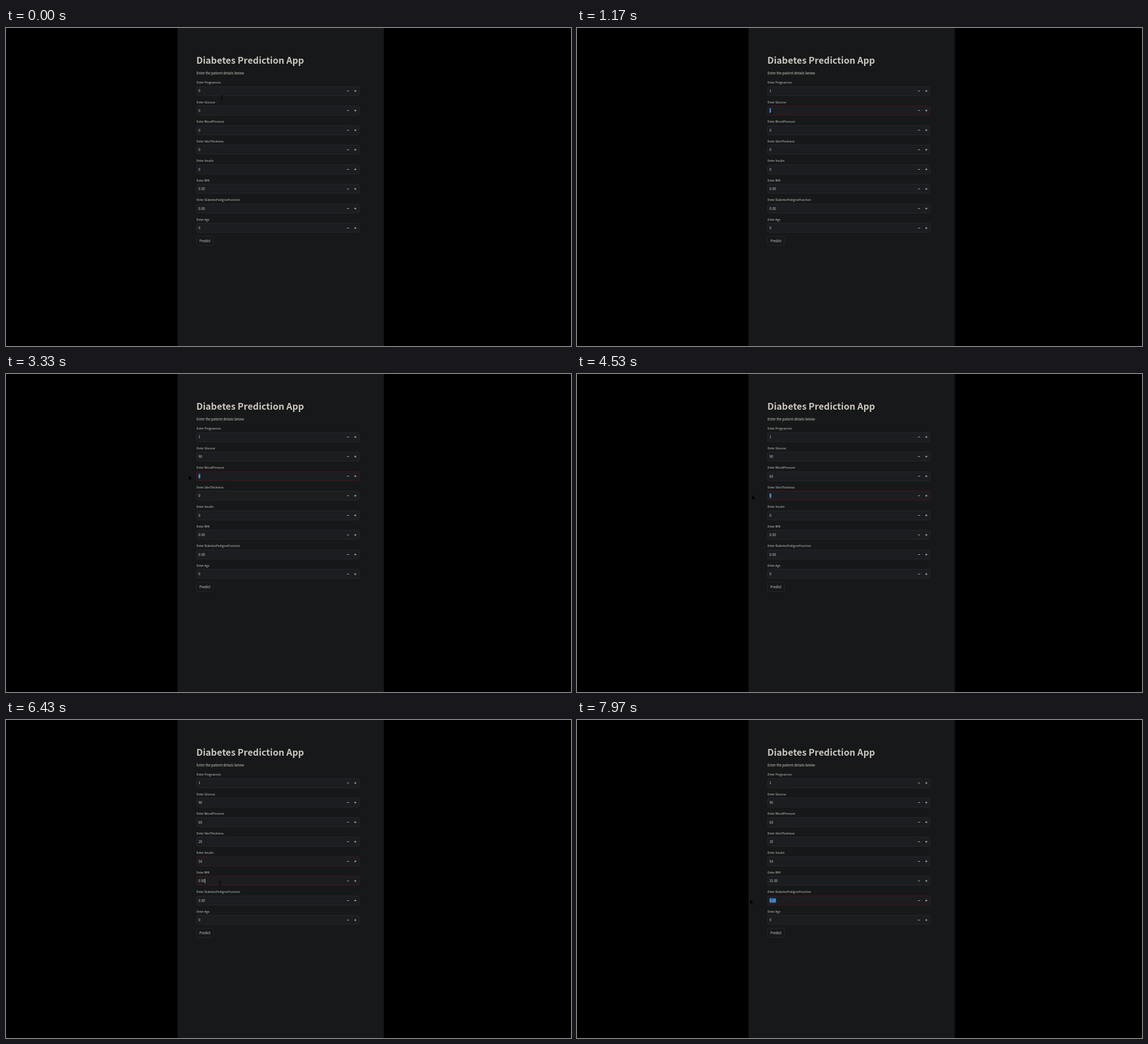
Animation of 998x561 px, one loop 8000 ms. Source, as an HTML page with a canvas:

```html
<!DOCTYPE html>
<html lang="en">
<head>
<meta charset="utf-8">
<title>Diabetes Prediction App</title>
<style>
  html, body { margin: 0; width: 100%; height: 100%; overflow: hidden; background: #000; }
  canvas { display: block; }
</style>
</head>
<body>
<canvas id="stage"></canvas>
<script>
const W = 998, H = 561, LOOP = 8000;
const ZOOM = 0.409;          // page scale inside the recording
const GLYPH = 1 / 1.117;     // the CJK family draws Latin letters larger
const FAMILY = '"Noto Sans CJK JP", "Noto Sans CJK SC", "Noto Sans CJK", "Open Sans", sans-serif';
const C = {
  panel: '#161819', field: '#1b1d20', border: '#26292d', focus: '#501019',
  title: '#cac7be', text: '#d2d0c9', hint: '#85847f', select: '#1c62ad'
};
const LEFT = 336.5, WIDTH = 287.5;
const APPROACH = 300, HOLD = 100, DRAG = 280, KEY_GAP = 180;

// focus: click time; clickX, outX: where the selecting drag starts and ends
const fields = [
  { name: 'Pregnancies', typed: '1', focus: 300, outX: 322 },
  { name: 'Glucose', typed: '90', focus: 1000, outX: 332 },
  { name: 'BloodPressure', typed: '60', focus: 3030, outX: 323 },
  { name: 'SkinThickness', typed: '20', focus: 4270, outX: 308 },
  { name: 'Insulin', typed: '54', focus: 5520, outX: 310 },
  { name: 'BMI', typed: '31', focus: 6340, outX: 337, clickX: 378, decimals: 2 },
  { name: 'DiabetesPedigreeFunction', typed: '0', focus: 7640, outX: 306, decimals: 2 },
  { name: 'Age', typed: '0', focus: LOOP + 1000 }
];
fields.forEach((f, i) => {
  const next = fields[i + 1];
  f.y = 111.1 + 34.56 * i;
  f.clickX = f.clickX || 350;
  f.blur = next ? next.focus : Infinity;
  f.firstKey = f.focus + 0.6 * (f.blur - f.focus);
});

const canvas = document.getElementById('stage');
const ctx = canvas.getContext('2d');
const dpr = window.devicePixelRatio || 1;
canvas.width = W * dpr;
canvas.height = H * dpr;
canvas.style.width = W + 'px';
canvas.style.height = H + 'px';

const clamp = v => Math.max(0, Math.min(1, v));
const ease = v => v * v * (3 - 2 * v);
const mix = (a, b, k) => a + (b - a) * k;
const progress = (t, from, to) => ease(clamp((t - from) / (to - from)));

function setFont(size, weight = 400) {
  ctx.font = `${weight} ${size * GLYPH}px ${FAMILY}`;
}

function text(str, x, y, size, { color = C.text, weight = 400, align = 'left' } = {}) {
  ctx.save();
  ctx.translate(x, y);
  ctx.scale(ZOOM, ZOOM);
  setFont(size, weight);
  ctx.textAlign = align;
  ctx.fillStyle = color;
  ctx.fillText(str, 0, 0);
  ctx.restore();
}

function textWidth(str, size) {
  setFont(size);
  return ctx.measureText(str).width * ZOOM;
}

function bar(x, y, w, h, color) {
  ctx.fillStyle = color;
  ctx.fillRect(x, y, w, h);
}

// A 16 px high rounded box whose edges sit on whole pixels
function box(x, y, w, fill, stroke) {
  ctx.beginPath();
  ctx.roundRect(x, Math.floor(y) + 0.5, w, 16, 3);
  if (fill) {
    ctx.fillStyle = fill;
    ctx.fill();
  }
  ctx.strokeStyle = stroke;
  ctx.lineWidth = 0.9;
  ctx.stroke();
}

function valueAt(f, t) {
  if (t >= f.blur) return Number(f.typed).toFixed(f.decimals || 0);
  if (t < f.firstKey) return (0).toFixed(f.decimals || 0);
  return f.typed.slice(0, 1 + Math.floor((t - f.firstKey) / KEY_GAP));
}

function drawField(f, t) {
  const focused = t >= f.focus && t < f.blur;
  const typing = focused && t >= f.firstKey;
  const selected = focused && !typing && t >= f.focus + HOLD + 20;
  const value = valueAt(f, t);
  const width = textWidth(value, 16);

  text('Enter ' + f.name, LEFT, f.y - 13, 14);
  box(LEFT, f.y - 8.1, WIDTH, C.field, C.border);
  ctx.globalAlpha = clamp((t - f.focus) / 100) * (1 - clamp((t - f.blur) / 200));
  box(LEFT, f.y - 8.1, WIDTH, null, C.focus);
  ctx.globalAlpha = 1;

  if (selected) bar(340, f.y - 4.4, width, 8.8, C.select);
  text(value, 340, f.y + 2.3, 16);

  const sinceInput = t - (typing ? f.firstKey : f.focus);
  if (focused && !selected && sinceInput % 1000 < 500) {
    bar(340 + width, f.y - 3.8, 0.7, 7.8, C.text);
  }
  if (typing) text('Press Enter to apply', 593.8, f.y + 6, 12, { color: C.hint, align: 'right' });

  bar(602.2, f.y - 0.4, 3.6, 0.8, C.text);
  bar(615.2, f.y - 0.4, 3.6, 0.8, C.text);
  bar(616.6, f.y - 1.8, 0.8, 3.6, C.text);
}

// The pointer comes to each field, clicks, drags left, and hides while typing
function pointerAt(t) {
  const i = fields.findIndex(f => t >= f.focus - APPROACH && t < f.firstKey && t < f.blur - APPROACH);
  if (i < 0) return null;
  const f = fields[i];
  const from = i ? { x: fields[i - 1].outX, y: fields[i - 1].y } : { x: 381, y: 123 };
  const clickY = f.y + 4;
  if (t < f.focus) {
    const k = progress(t, f.focus - APPROACH, f.focus);
    return [mix(from.x, f.clickX, k), mix(from.y, clickY, k)];
  }
  const k = progress(t, f.focus + HOLD, f.focus + DRAG);
  return [mix(f.clickX, f.outX, k), mix(clickY, f.y - 1.5, k)];
}

function drawPointer(t) {
  const p = pointerAt(t);
  if (!p) return;
  const [x, y] = p;
  if (x >= LEFT) {
    bar(x - 0.5, y - 3.5, 1, 7, '#000');
    bar(x - 1.8, y - 3.7, 3.6, 0.9, '#000');
    bar(x - 1.8, y + 2.8, 3.6, 0.9, '#000');
    return;
  }
  ctx.save();
  ctx.translate(x, y);
  ctx.fillStyle = '#000';
  ctx.fill(new Path2D('M0 0V7.6L1.8 6L3 8.8L4.2 8.3L3 5.5L5.2 5.3Z'));
  ctx.restore();
}

function draw(t) {
  ctx.setTransform(dpr, 0, 0, dpr, 0, 0);
  bar(0, 0, W, H, '#000');
  bar(303, 0, 364.5, H, C.panel);
  text('Diabetes Prediction App', 336.2, 63.2, 44, { color: C.title, weight: 700 });
  text('Enter the patient details below:', LEFT, 81.5, 16);
  fields.forEach(f => drawField(f, t));
  box(LEFT, 367.2, 30, null, C.border);
  text('Predict', 351.5, 377.7, 16, { align: 'center' });
  drawPointer(t);
}

const start = performance.now();
function tick() {
  draw((performance.now() - start) % LOOP);
  requestAnimationFrame(tick);
}
tick();
</script>
</body>
</html>
```
